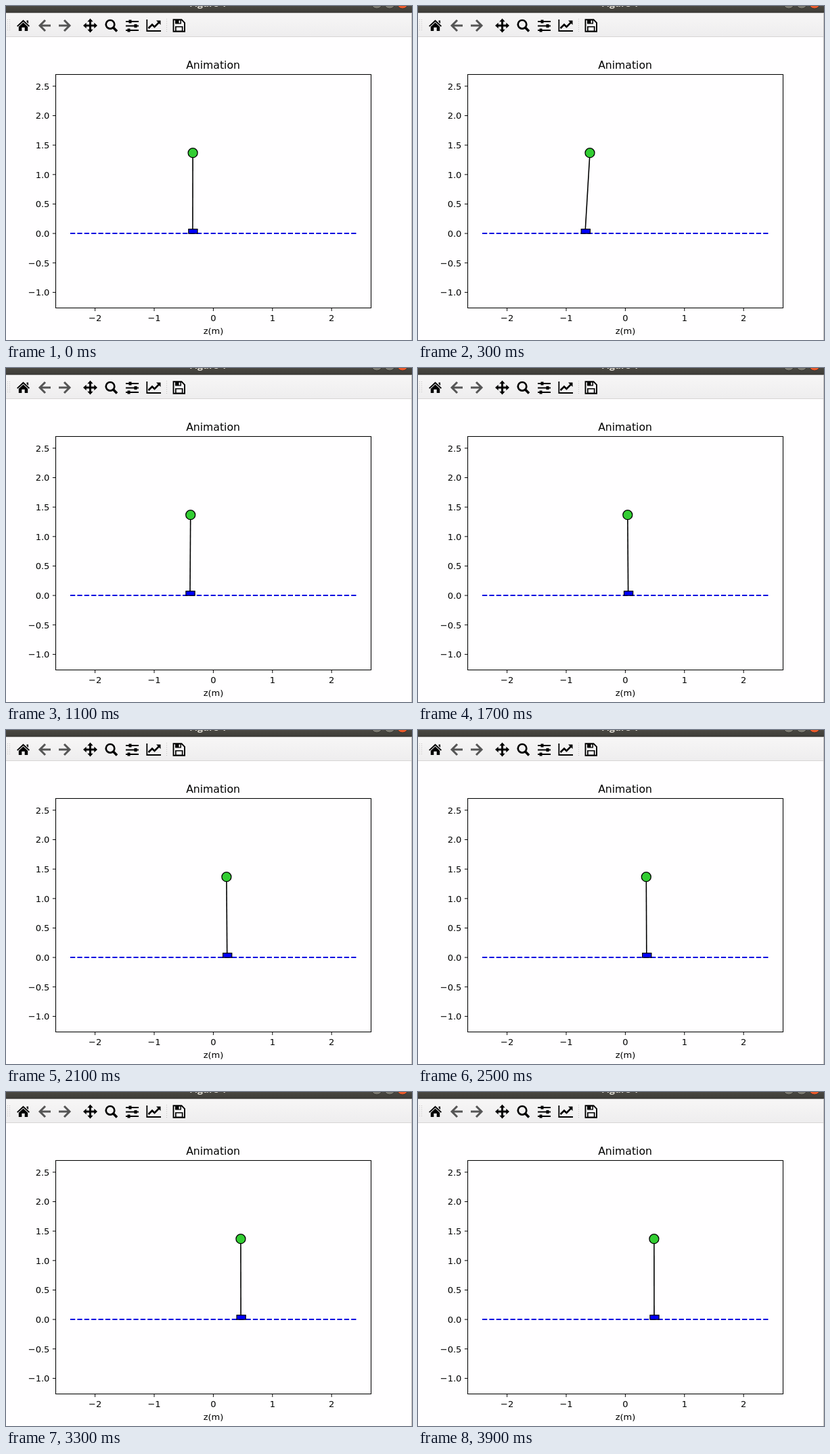
Recreate the animation shown at these times as an HTML page. Size 600 by 495 pixels, loop 4000 ms.

```html
<!DOCTYPE html>
<html lang="en">
<head>
<meta charset="utf-8">
<title>Animation</title>
<style>
  html, body { margin: 0; width: 100%; height: 100%; overflow: hidden; background: #fffeff; }
  svg { display: block; width: 600px; height: 495px; }
  text { font-family: "DejaVu Sans", sans-serif; font-size: 13.05px; fill: #000; }
  .title { font-size: 15.65px; }
  .caption { font: 700 14px "Open Sans", sans-serif; fill: #dfdbd2; }
  .mid { text-anchor: middle; }
  .end { text-anchor: end; }
  .line { fill: none; stroke: #000; }
</style>
</head>
<body>
<svg viewBox="0 0 600 495">
  <defs>
    <linearGradient id="bar" x2="0" y2="1">
      <stop offset="0" stop-color="#4a4842"/><stop offset="1" stop-color="#3c3b37"/>
    </linearGradient>
    <linearGradient id="tools" x2="0" y2="1">
      <stop offset="0" stop-color="#f7f6f6"/><stop offset="1" stop-color="#eeedee"/>
    </linearGradient>
  </defs>
  <rect width="600" height="495" fill="#fffeff"/>

  <!-- window frame -->
  <rect width="600" height="10.5" fill="url(#bar)"/>
  <text class="caption mid" x="298.5" y="1">Figure 1</text>
  <g stroke="#33322e">
    <circle cx="548" cy="-4" r="8" fill="#7b7970"/>
    <circle cx="567" cy="-4" r="8" fill="#7b7970"/>
    <circle cx="586" cy="-4" r="8" fill="#ea5a2b"/>
  </g>
  <rect y="10.5" width="600" height="35" fill="url(#tools)"/>
  <path d="M0 45.5H600" stroke="#d6d4d4"/>
  <path d="M599.5 10V495" stroke="#bdbbbb"/>
  <path d="M2.5 20V38M5.5 20V38M237.5 19V39" stroke="#c4c2c2" stroke-dasharray="1 2"/>

  <!-- toolbar icons -->
  <g>
    <path d="M25.5 20.5L35 29.5L33.7 30.8L25.5 23.2L17.3 30.8L16 29.5ZM30.5 21.5H33V26L30.5 23.6ZM25.5 24.6L32.2 30.8V37H27.7V31.8H23.3V37H18.8V30.8Z"/>
    <g id="arrow" fill="none" stroke="#555" stroke-width="3">
      <path d="M66 29H51M58 21L50 29L58 37"/>
    </g>
    <use href="#arrow" transform="matrix(-1 0 0 1 144 0)"/>
    <path d="M124.5 18.5L128.7 23.2H126V27.5H130.3V24.8L135 29L130.3 33.2V30.5H126V34.8H128.7L124.5 39.5L120.3 34.8H123V30.5H118.7V33.2L114 29L118.7 24.8V27.5H123V23.2H120.3Z"/>
    <g fill="none" stroke="#000">
      <circle cx="154" cy="27.3" r="6.3" stroke-width="2.7"/>
      <path d="M158.6 32L164 37.5" stroke-width="3.6"/>
      <path d="M177 23H196M177 29.5H196M177 36H196" stroke-width="1.8"/>
      <path d="M183.5 20.6V25.4M191.5 27.1V31.9M181.5 33.6V38.4" stroke-width="4"/>
      <path d="M208.3 20V37H229" stroke-width="1.8"/>
      <path d="M210.5 33L216 27.5L219.5 31L226 24.3" stroke-width="2.6"/>
    </g>
    <path d="M222 21.5H228.5V28Z"/>
    <path d="M247.5 20.3H259.5L264 24.8V37.7H247.5Z" fill="#f8f7f8" stroke="#000" stroke-width="1.9"/>
    <path d="M250 20H259V26.5H250ZM250 30H261.5V38H250Z"/>
    <path d="M255.5 21.5H257.5V25.2H255.5ZM251.7 31.5H259.8V36.5H251.7Z" fill="#f8f7f8"/>
  </g>

  <!-- plot -->
  <text class="title mid" x="306" y="93">Animation</text>
  <text class="mid" x="306.5" y="485.5">z(m)</text>
  <g id="ticks"></g>
  <path d="M95 337H517.7" stroke="#0000e0" stroke-width="1.8" stroke-dasharray="7.25 3.13"/>
  <path id="pole" class="line" stroke-width="1.6"/>
  <rect id="cart" y="330.7" width="13.2" height="6.5" fill="#00f" stroke="#000" stroke-width="1.2"/>
  <circle id="bob" cy="217.7" r="7" fill="#32cd32" stroke="#000" stroke-width="1.3"/>
  <rect class="line" x="73.5" y="101.5" width="466" height="346" stroke-width="1.05"/>
</svg>
<script>
const LOOP = 4000, STEP = 100;
const $ = id => document.getElementById(id);

function put(parent, name, attrs, text = "") {
  const el = document.createElementNS("http://www.w3.org/2000/svg", name);
  for (const key in attrs) el.setAttribute(key, attrs[key]);
  el.textContent = text;
  parent.append(el);
}

const label = (v, digits) => v.toFixed(digits).replace("-", "\u2212");
const ticks = $("ticks");
for (let v = -2; v <= 2; v++) {
  const x = 306.4 + v * 87.4;
  put(ticks, "path", { class: "line", d: `M${x} 447.5v4.6` });
  // the minus sign counts towards the centred width
  put(ticks, "text", { class: "mid", x, y: 466.5 }, label(v, 0));
}
for (let v = -1; v <= 2.5; v += 0.5) {
  const y = 337.1 - v * 87.3;
  put(ticks, "path", { class: "line", d: `M73.5 ${y}h-4.6` });
  put(ticks, "text", { class: "end", x: 64.4, y: y + 4.8 }, label(v, 1));
}

// time in ms, cart centre, lean of the bob to the right
const keys = [
  [0, 276.4, 0.2], [100, 264.9, 3], [200, 255, 5.3], [300, 247.8, 6.7],
  [400, 243.8, 7], [500, 242.6, 6.4], [600, 244.1, 5.2], [700, 248.1, 3.9],
  [900, 258.9, 2.1], [1100, 272.5, 0.7], [1300, 286.5, -0.2], [1700, 311.1, -0.8],
  [2100, 327.2, -0.8], [2500, 338.3, -0.5], [2900, 344.4, -0.3],
  [3300, 347.6, -0.2], [3900, 349.5, -0.1]
];

function slope(i, c) {
  const a = keys[Math.max(i - 1, 0)], b = keys[Math.min(i + 1, keys.length - 1)];
  return (b[c] - a[c]) / (b[0] - a[0]);
}

// cubic Hermite through the keys
function sample(t, c) {
  let i = 0;
  while (i < keys.length - 2 && t >= keys[i + 1][0]) i++;
  const a = keys[i], b = keys[i + 1], h = b[0] - a[0], u = (t - a[0]) / h, w = 1 - u;
  return w * w * ((1 + 2 * u) * a[c] + u * h * slope(i, c))
       + u * u * ((3 - 2 * u) * b[c] - w * h * slope(i + 1, c));
}

const start = performance.now();
function draw() {
  const t = Math.floor(((performance.now() - start) % LOOP) / STEP) * STEP;
  const cart = sample(t, 1), foot = cart - 0.5, bob = foot + sample(t, 2);
  $("cart").setAttribute("x", cart - 6.6);
  $("bob").setAttribute("cx", bob);
  $("pole").setAttribute("d", `M${foot} 331L${bob} 218`);
  requestAnimationFrame(draw);
}
draw();
</script>
</body>
</html>
```
